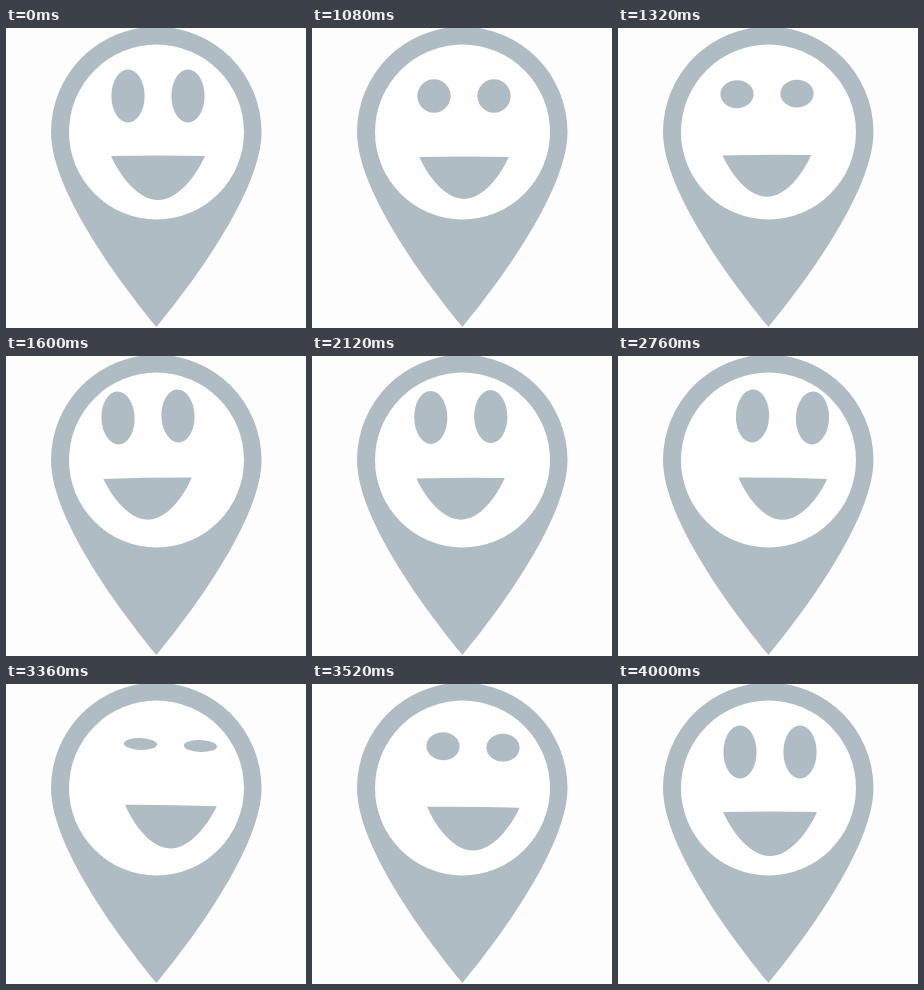
These frames come from a looping animation (300 px wide and 300 px high, 4.04 s). An HTML page:

```html
<!DOCTYPE html>
<html lang="en">
<head>
<meta charset="utf-8">
<title>Smiling map pin</title>
<style>
  html, body { margin: 0; width: 100%; height: 100%; overflow: hidden; background: #fdfdfd; }
  svg { display: block; width: 100%; height: 100%; fill: #b0bcc3; }
</style>
</head>
<body>
<svg viewBox="0 0 300 300">
  <path d="M150.5 299C120 262 45 165 45 104A105.25 105.25 0 0 1 255.5 104C255.5 165 181 262 150.5 299Z"/>
  <circle cx="150.5" cy="104" r="87.5" fill="#fefefe"/>
  <g id="eyes">
    <ellipse cx="-30" rx="16.6" ry="26.5"/>
    <ellipse cx="30" rx="16.6" ry="26.5"/>
  </g>
  <path id="mouth" d="M-47 -22Q0 -23 47 -22C38 -2 20 22 0 22C-20 22 -38 -2 -47 -22Z"/>
</svg>
<script>
const LOOP = 4040, STEP = 40;
const eyes = document.getElementById('eyes');
const mouth = document.getElementById('mouth');

// Eased progress from 0 to 1 between two times.
function ease(t, from, to) {
  const p = Math.min(1, Math.max(0, (t - from) / (to - from)));
  return p * p * (3 - 2 * p);
}

const blink = (t, shut) => ease(t, shut - 220, shut) - ease(t, shut, shut + 260);

function draw(t) {
  const left = ease(t, 1160, 1600);
  const right = ease(t, 1960, 2400);
  const home = ease(t, 3360, 3820);

  const x = 152 - 10 * left + 22.5 * right - 12.5 * home;
  const lift = 7 * (left - home);
  const tilt = -1.9 * left + 3.8 * right - 1.9 * home;

  const ry = 26.5 - 22.5 * (blink(t, 1200) + blink(t, 3400));
  for (const eye of eyes.children) eye.setAttribute('ry', ry);
  eyes.setAttribute('transform', `translate(${x} ${68 - lift}) rotate(${tilt})`);

  const size = 1 - 0.06 * (ease(t, 0, 1500) - ease(t, 2480, LOOP));
  mouth.setAttribute('transform',
    `translate(${x} ${150 - lift}) rotate(${tilt / 2}) scale(${size})`);
}

function tick() {
  const t = performance.now() % LOOP;
  draw(Math.floor(t / STEP) * STEP);
  requestAnimationFrame(tick);
}
tick();
</script>
</body>
</html>
```
